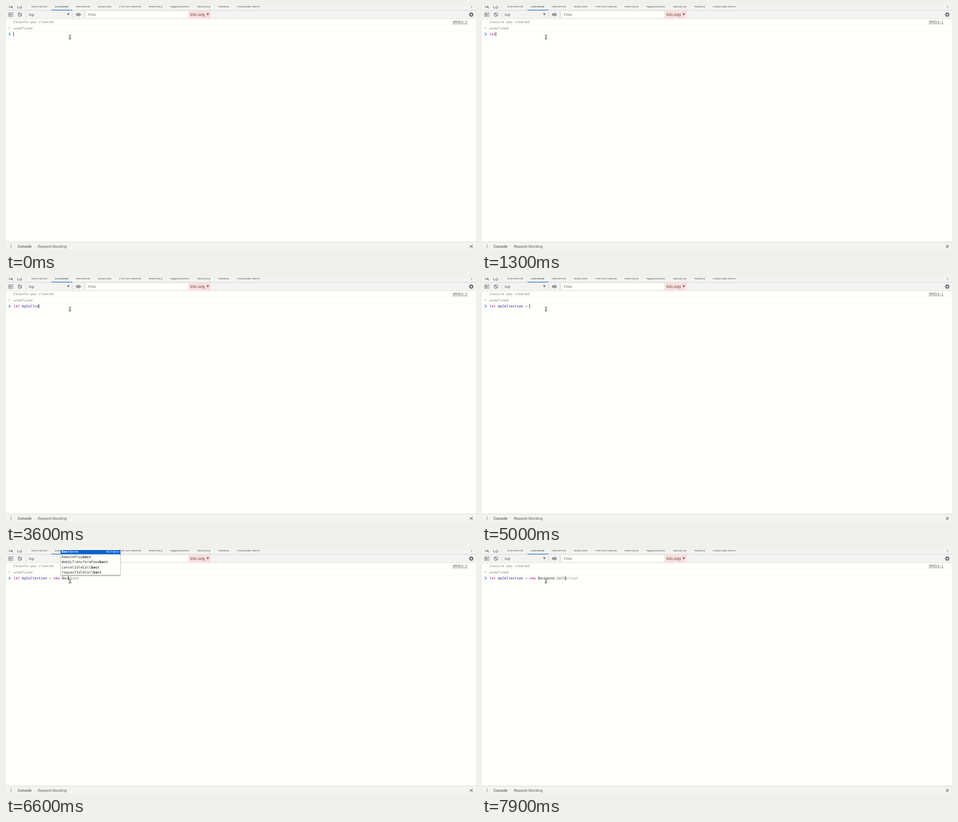
Write an HTML page with a canvas that moves like this. It is 1036 by 540 pixels and loops after 8 s.

```html
<!DOCTYPE html>
<html lang="en">
<head>
<meta charset="utf-8">
<title>Console typing</title>
<style>
  html, body { margin: 0; width: 100%; height: 100%; overflow: hidden; background: #fffffc; }
  canvas { display: block; }
</style>
</head>
<body>
<canvas id="stage" width="1036" height="540"></canvas>
<script>
const ctx = document.getElementById('stage').getContext('2d');
const LOOP = 8000;
const MONO = '7.71px "DejaVu Sans Mono", monospace';
const SANS = '8.4px Roboto, sans-serif';
const CHAR = 4.645, PROMPT_X = 16.35, ROW = 11.43;
const words = s => s.trim().split(/\s+/);

const startsL = words(`length localStorage location locationbar LinearAccelerationSensor Location Lock
  LockManager AbortController AbortSignal AbsoluteOrientationSensor Accelerometer AnalyserNode
  ApplicationCache ApplicationCacheErrorEvent AudioScheduledSourceNode AudioWorklet AudioWorkletNode
  BeforeInstallPromptEvent BeforeUnloadEvent`);
const startsLe = words(`length Accelerometer AudioScheduledSourceNode CSSConditionRule CSSFontFaceRule
  CSSGroupingRule CSSImportRule CSSKeyframeRule CSSKeyframesRule CSSMediaRule CSSNamespaceRule
  CSSPageRule CSSRule CSSRuleList CSSStyleDeclaration CSSStyleRule CSSStyleSheet CSSSupportsRule
  File FileList`);
const startsN = words(`name navigator NaN NamedNodeMap Navigator NetworkInformation Node NodeFilter
  NodeIterator NodeList Notification Number AbortController AbortSignal AbsoluteOrientationSensor
  AnalyserNode Animation AnimationEffect AnimationEvent ApplicationCache`);
const startsNe = words(`NetworkInformation AnimationEffect AnimationEvent AudioListener Backbone
  ChannelMergerNode ChannelSplitterNode CompositionEvent DeviceMotionEvent DeviceOrientationEvent
  HTMLButtonElement HTMLOptionElement HTMLSpanElement HTMLUnknownElement MIDIConnectionEvent
  PageTransitionEvent PresentationConnection SVGPolylineElement SVGSpanElement TransitionEvent`);
const startsB = words(`Backbone BarProp BaseAudioContext BatteryManager BeforeInstallPromptEvent
  BeforeUnloadEvent BiquadFilterNode Blob BlobEvent Boolean BroadcastChannel
  ByteLengthQueuingStrategy blur AbortController AbortSignal AbsoluteOrientationSensor ArrayBuffer
  AudioBuffer AudioBufferSourceNode CSSVariableReferenceValue`);
const startsBa = words(`Backbone BarProp BaseAudioContext BatteryManager RemotePlayback
  WebGLTransformFeedback cancelIdleCallback locationbar menubar personalbar requestIdleCallback
  scrollbars statusbar toolbar`);
const startsBac = words('Backbone RemotePlayback WebGLTransformFeedback cancelIdleCallback requestIdleCallback');
const members = words(`$ Collection CollectionView Command Controller Events History Model Router
  VERSION View SortedCollection ajax bind emulateHTTP emulateJSON history listenTo listenToOnce noConflict`);
const membersCo = words('Collection CollectionView Command Controller constructor SortedCollection noConflict');
const membersC = [...membersCo, 'localStorage', 'sync', 'toLocaleString'];
const membersCol = words('Collection CollectionView SortedCollection');

// Each step: start time, typed text, suggestions, options
const INIT = 'let myCollection = new ';
const NS = INIT + 'Backbone';
const member = { owner: 'Object', width: 106.2 };
const steps = [
  [0, ''], [300, '', [], { caret: false }], [900, ''],
  [1100, 'l', startsL], [1200, 'le', startsLe], [1300, 'let'], [1400, 'let m'],
  [1800, 'let my'], [1900, 'let myCo'], [2100, 'let myCol'], [2200, 'let myColl'],
  [2500, 'let myCollc'], [2600, 'let myCollce'], [2700, 'let myCollceti'], [2800, 'let myCollcetion'],
  [3100, 'let myCollcetio'], [3200, 'let myCollceti'], [3400, 'let myCollcet'],
  [3600, 'let myCollce'], [3700, 'let myCollc'], [3900, 'let myColl'], [4000, 'let myColle'],
  [4200, 'let myCollec'], [4300, 'let myCollect'], [4400, 'let myCollectio'],
  [4600, 'let myCollection'], [4700, 'let myCollection '], [4800, 'let myCollection ='],
  [5000, 'let myCollection = '], [5200, 'let myCollection = n', startsN],
  [5300, 'let myCollection = ne', startsNe], [5400, 'let myCollection = new'],
  [5500, INIT], [5900, INIT, [], { caret: false }],
  [6400, INIT + 'B', startsB], [6500, INIT + 'Ba', startsBa], [6600, INIT + 'Bac', startsBac],
  [6700, INIT + 'Back', startsBac], [6800, INIT + 'Backb', ['Backbone']],
  [7000, INIT + 'Backbo', ['Backbone']], [7100, NS],
  [7300, NS + '.', members, { owner: 'Object', width: 122.2 }],
  [7400, NS + '.C', membersC, member], [7500, NS + '.Co', membersCo, member],
  [7700, NS + '.Col', membersCol, member], [7900, NS + '.Coll', ['Collection']],
];

function rect(x, y, w, h, color) {
  ctx.fillStyle = color;
  ctx.fillRect(x, y, w, h);
}

function text(str, x, y, color, font = MONO) {
  ctx.font = font;
  ctx.fillStyle = color;
  ctx.fillText(str, x, y);
}

function poly(points, color) {
  ctx.fillStyle = color;
  ctx.beginPath();
  points.forEach(([x, y]) => ctx.lineTo(x, y));
  ctx.fill();
}

function line(points, color, width = 1) {
  ctx.strokeStyle = color;
  ctx.lineWidth = width;
  ctx.beginPath();
  points.forEach(([x, y], i) => i ? ctx.lineTo(x, y) : ctx.moveTo(x, y));
  ctx.stroke();
}

function circle(x, y, r, color, width) {
  ctx.beginPath();
  ctx.arc(x, y, r, 0, Math.PI * 2);
  ctx.fillStyle = ctx.strokeStyle = color;
  ctx.lineWidth = width;
  width ? ctx.stroke() : ctx.fill();
}

const ICON = '#6a6a6a';
const divider = (x, y, h) => rect(x, y, 0.8, h, '#cccccc');
const downArrow = (x, y, color, w = 2.6, h = 5) => poly([[x - w, y], [x + w, y], [x, y + h]], color);
const dots = (x, y) => [-3.3, 0, 3.3].forEach(d => circle(x, y + d, 0.9, ICON));

function drawTabs() {
  rect(0, 0, 1036, 28, '#f3f3f1');
  rect(0, 9.2, 1036, 0.8, '#cfcfcd');
  const tabs = [['Elements', 56], ['Console', 107.3], ['Network', 154], ['Sources', 202],
    ['Performance', 249.2], ['Memory', 314.4], ['Application', 362], ['Security', 421],
    ['Audits', 468], ['Hushtab Mint', 508.8]];
  tabs.forEach(([name, x]) => text(name, x, 2.9, name === 'Console' ? '#333333' : '#5a5a5a', SANS));
  rect(100, 8.4, 46, 1.5, '#3079d6');
  line([[7, 0], [7, 3.5], [9, 3.5]], ICON, 1);
  poly([[10, 0], [15.5, 1.2], [13, 2.2], [15.6, 4.6], [14.6, 5.4], [12.2, 3], [11, 5]], ICON);
  line([[25.5, 0], [25.5, 4.4], [30, 4.4]], ICON, 1);
  line([[31, 0], [34.5, 0], [34.5, 4.9], [31, 4.9], [31, 0]], ICON, 1);
  divider(43.3, 0, 6);
  dots(1026, 0.2);
}

function drawEye(x, y) {
  ctx.fillStyle = ICON;
  ctx.beginPath();
  ctx.moveTo(x - 5.6, y);
  ctx.quadraticCurveTo(x, y - 7.4, x + 5.6, y);
  ctx.quadraticCurveTo(x, y + 7.4, x - 5.6, y);
  ctx.fill();
  circle(x, y, 2.5, '#f3f3f1');
  circle(x, y, 1.5, ICON);
}

function drawGear(x, y) {
  for (let i = 0; i < 8; i++) {
    const a = i * Math.PI / 4, c = Math.cos(a), s = Math.sin(a);
    line([[x + c * 3, y + s * 3], [x + c * 5, y + s * 5]], ICON, 2);
  }
  circle(x, y, 2.9, ICON, 2.1);
}

function drawToolbar() {
  ctx.strokeStyle = ICON;
  ctx.lineWidth = 0.9;
  ctx.strokeRect(6, 15, 9.2, 8);
  line([[8, 15], [8, 23]], ICON, 0.9);
  poly([[9.8, 16.6], [13.6, 19], [9.8, 21.4]], ICON);
  circle(30.6, 19, 3.9, ICON, 1.2);
  line([[27.9, 16.3], [33.3, 21.7]], ICON, 1.2);
  divider(43.3, 13, 12);
  text('top', 50, 21.9, '#5a5a5a', SANS);
  downArrow(137.4, 16.3, ICON);
  divider(145.8, 13, 12);
  drawEye(159.6, 19);
  divider(172.2, 13, 12);
  rect(177, 12, 224, 14, '#fffffc');
  text('Filter', 180.2, 22.2, '#7a7a7a', SANS);
  rect(403, 11, 48, 16, '#fbdcdc');
  text('Info only', 406.3, 21.9, '#5b4545', SANS);
  downArrow(444.8, 16.2, '#6b5555');
  drawGear(1025.6, 19);
  rect(0, 28, 1036, 0.8, '#dcdcda');
}

function drawLog() {
  text('Console was cleared', PROMPT_X, 38, '#808080', 'italic ' + MONO);
  text('VM454:1', 984.4, 38, '#5a5a5a');
  rect(984.4, 39, 32.5, 0.7, '#5a5a5a');
  rect(0, 41.8, 1036, 0.8, '#f0f0ee');
  line([[7.8, 46.6], [5.4, 49], [7.8, 51.4]], '#a5a5a5', 0.9);
  circle(9.2, 49, 0.7, '#a5a5a5');
  text('undefined', PROMPT_X, 51.6, '#868686');
  rect(0, 55, 1036, 0.8, '#f0f0ee');
  line([[6.3, 59.6], [9.2, 62.3], [6.3, 65]], '#2f72dc', 1.4);
}

function drawFooter() {
  rect(0, 522, 1036, 18, '#f3f3f1');
  rect(0, 521.8, 1036, 0.9, '#cfcfcd');
  dots(11, 532);
  text('Console', 25.8, 534.6, '#333333', SANS);
  text('Request blocking', 70, 534.6, '#5a5a5a', SANS);
  line([[1022.5, 528.8], [1028.7, 535]], ICON, 1.2);
  line([[1028.7, 528.8], [1022.5, 535]], ICON, 1.2);
}

function drawPrompt(typed, ghost, caret) {
  const parts = typed.match(/^(let\b)?( \w+)?( =)?( new\b)?(.*)$/).slice(1);
  const colors = ['#aa0d91', '#1a1a82', '#a8641c', '#aa0d91', '#303030'];
  let x = PROMPT_X;
  parts.forEach((part = '', i) => {
    text(part, x, 64.6, colors[i]);
    x += part.length * CHAR;
  });
  text(ghost, x, 64.6, '#8c8c8c');
  if (caret) rect(x, 57.8, 0.9, 9.2, '#000000');
}

function drawScrollbar(x, y, h) {
  rect(x, y, 10, h, '#f1f1f0');
  rect(x + 0.8, y + 10.6, 8.4, 16.4, '#c1c1c1');
  downArrow(x + 5, y + 7.6, '#7d7d7d', 2.4, -2.6);
  downArrow(x + 5, y + h - 6.8, '#404040', 2.4, 2.6);
}

function drawItem(item, query, x, y, color) {
  const at = item.toLowerCase().indexOf(query.toLowerCase());
  const end = at + query.length;
  text(item.slice(0, at), x, y, color);
  text(item.slice(at, end), x + at * CHAR, y, color, 'bold ' + MONO);
  text(item.slice(end), x + end * CHAR, y, color);
}

function drawPopup(items, query, textX, { owner = 'Window', width }) {
  const scrolls = items.length >= 20;
  const longest = Math.max(...items.map(s => s.length));
  const w = width || (scrolls ? 196.8 : (longest + 6) * CHAR + 1.4);
  const h = items.length * ROW;
  const x = textX - 2.6;
  const y = items.length > 5 ? 68.8 : 55.3 - h;
  ctx.save();
  ctx.shadowColor = 'rgba(0,0,0,.4)';
  ctx.shadowBlur = 3;
  ctx.shadowOffsetY = 1.2;
  rect(x, y, w, h, '#fffffc');
  ctx.restore();
  ctx.strokeStyle = 'rgba(0,0,0,.25)';
  ctx.lineWidth = 0.7;
  ctx.strokeRect(x, y, w, h);

  const inner = scrolls ? w - 10.4 : w;
  rect(x, y, inner, ROW, '#0a63cb');
  items.forEach((item, i) => drawItem(item, query, x + 2, y + i * ROW + 8.1, i ? '#303030' : '#ffffff'));
  text(owner, x + inner - 2.9 - owner.length * CHAR, y + 8.1, '#d6e6fa');
  if (scrolls) drawScrollbar(x + inner, y, h);
}

function drawPointer(x, y) {
  const beam = (color, width) => {
    line([[x - 2.6, y - 4.2], [x - 0.8, y - 4.2], [x, y - 3.4], [x + 0.8, y - 4.2], [x + 2.6, y - 4.2]], color, width);
    line([[x - 2.6, y + 4.2], [x - 0.8, y + 4.2], [x, y + 3.4], [x + 0.8, y + 4.2], [x + 2.6, y + 4.2]], color, width);
    line([[x, y - 3.6], [x, y + 3.6]], color, width);
    line([[x - 1.4, y + 1.4], [x + 1.4, y + 1.4]], color, width);
  };
  beam('rgba(255,255,255,.8)', 2.2);
  beam('#222222', 1);
}

function draw(time) {
  const [, typed, items = [], options = {}] = steps.findLast(step => step[0] <= time);
  const query = typed.match(/\w*$/)[0];
  const first = items[0] || '';
  const ghost = query && first.startsWith(query) ? first.slice(query.length) : '';

  ctx.textRendering = 'geometricPrecision';
  rect(0, 0, 1036, 540, '#fffffc');
  drawTabs();
  drawToolbar();
  drawLog();
  drawFooter();
  drawPrompt(typed, ghost, options.caret !== false);
  if (items.length > 1) {
    drawPopup(items, query, PROMPT_X + (typed.length - query.length) * CHAR, options);
  }
  drawPointer(141, 69);
}

function tick() {
  draw(performance.now() % LOOP);
  requestAnimationFrame(tick);
}
tick();
</script>
</body>
</html>
```
